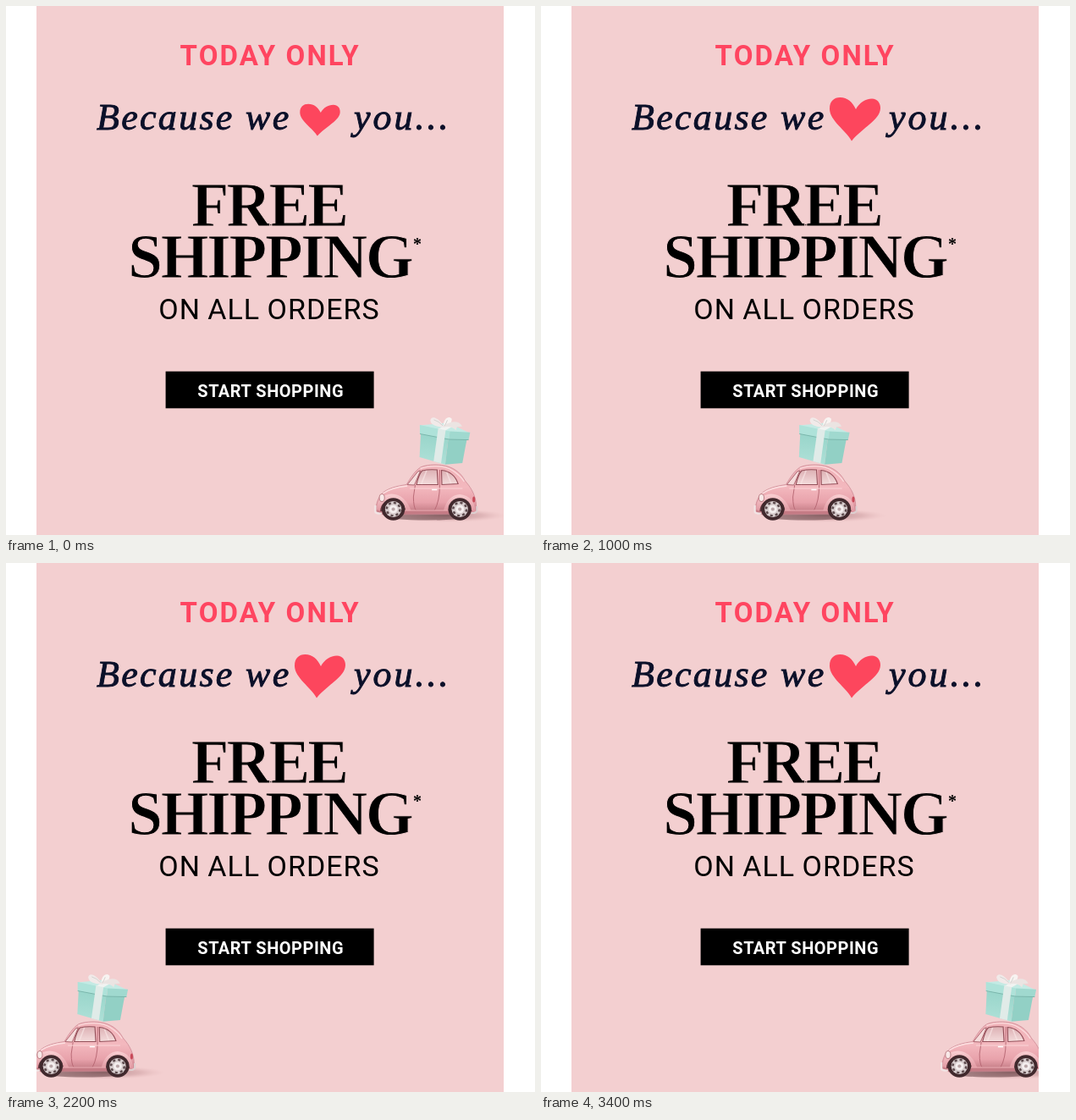
An HTML page that plays this animation: 625 by 625 pixels, repeating every 3600 ms.

```html
<!DOCTYPE html>
<html lang="en">
<head>
<meta charset="utf-8">
<title>Free shipping</title>
<style>
  html, body { margin: 0; width: 100%; height: 100%; overflow: hidden; background: #fff; }
  svg { display: block; width: 100vw; height: 100vh; }
  text { white-space: pre; }
  .sans { font-family: Roboto, sans-serif; text-anchor: middle; }
  .serif { font-family: "Liberation Serif", "Times New Roman", serif; }
  .script { font-size: 44px; font-style: italic; fill: #0b1029; stroke: #0b1029; stroke-width: .9; }
  /* a card-coloured stroke thins the hairlines */
  .big { font-size: 73px; font-weight: 700; text-anchor: middle; stroke: #f3cfd0; stroke-width: 1; }
</style>
</head>
<body>
<svg viewBox="0 0 625 625" xmlns="http://www.w3.org/2000/svg">
  <defs>
    <clipPath id="card"><rect x="36" width="552" height="625"/></clipPath>
    <linearGradient id="paint" x1="0" y1="0" x2="0" y2="1">
      <stop offset="0" stop-color="#f0b2b8"/>
      <stop offset=".45" stop-color="#f3b8be"/>
      <stop offset=".75" stop-color="#e8a2ab"/>
      <stop offset="1" stop-color="#b9717a"/>
    </linearGradient>
    <linearGradient id="fender" x1="0" y1="0" x2="0" y2="1">
      <stop offset="0" stop-color="#fad0d3"/>
      <stop offset="1" stop-color="#df949e"/>
    </linearGradient>
    <linearGradient id="glass" x1="0" y1="0" x2="0" y2="1">
      <stop offset="0" stop-color="#dcb0b3"/>
      <stop offset="1" stop-color="#f4dcdc"/>
    </linearGradient>
    <linearGradient id="boxFront" x1="0" y1="0" x2="0" y2="1">
      <stop offset="0" stop-color="#98d5ca"/>
      <stop offset="1" stop-color="#aee0d7"/>
    </linearGradient>
    <radialGradient id="shade">
      <stop offset="0" stop-color="#8f5c60" stop-opacity=".6"/>
      <stop offset=".6" stop-color="#b98488" stop-opacity=".35"/>
      <stop offset="1" stop-color="#e0b2b4" stop-opacity="0"/>
    </radialGradient>
    <g id="wheel">
      <circle r="13.2" fill="#41292d"/>
      <circle r="9.4" fill="#d6cbcc"/>
      <circle r="7.6" fill="none" stroke="#5d4a4d" stroke-width="2.4" stroke-dasharray="3 2.97"/>
      <circle r="4.8" fill="#f4eeee"/>
      <circle r="2" fill="#b9a5a7"/>
    </g>
  </defs>

  <rect x="36" width="552" height="625" fill="#f3cfd0"/>

  <text class="sans" x="312.2" y="70" font-size="33" font-weight="700" letter-spacing="2.1" fill="#ff4560">TODAY ONLY</text>

  <text class="serif script" x="107" y="146" letter-spacing="2.3">Because we</text>
  <text class="serif script" x="411" y="146" letter-spacing="3">you...</text>
  <path id="heart" fill="#fd465d" d="M-4 26C-10 14-30 2-30-12C-30-21-25-25.500-17.500-25.500C-9-25.500-3-20 1-11.500C5-19 12-24 20-24C26.500-24 30-19 30-13C30 1 9 10-4 26Z"/>

  <text class="serif big" x="310.500" y="260" letter-spacing="-2.8">FREE</text>
  <text class="serif big" x="312" y="321" letter-spacing="-2.2">SHIPPING</text>
  <text class="serif" x="486" y="288" font-size="20" font-weight="700" text-anchor="middle">*</text>
  <text class="sans" x="311" y="370" font-size="34" letter-spacing="1" word-spacing="-1">ON ALL ORDERS</text>

  <rect x="188.600" y="431.700" width="246" height="43.600"/>
  <text class="sans" x="312.700" y="461.500" font-size="20" font-weight="700" letter-spacing=".5" fill="#fff">START SHOPPING</text>

  <g clip-path="url(#card)">
    <g id="car">
      <ellipse cx="520" cy="602" rx="72" ry="8" fill="url(#shade)"/>
      <ellipse cx="497" cy="603" rx="49" ry="4.500" fill="#5d3a3e" opacity=".5"/>

      <!-- gift -->
      <g transform="rotate(5 517 518)">
        <path d="M489 507L522 510L521 541.500L490 535.500Z" fill="url(#boxFront)"/>
        <path d="M522 510L544 508L541 538L521 541.500Z" fill="#92d0c5"/>
        <path d="M487 498L520 492L547 502L523 504Z" fill="#c4eae4"/>
        <path d="M487 497.500L523 502L523 511.500L488 508Z" fill="#aee2d9"/>
        <path d="M523 502L547 501L546 510L523 511.500Z" fill="#a0d9cf"/>
        <path d="M488 508L523 511.500L546 510" fill="none" stroke="#78b5aa" stroke-width=".9"/>
        <path d="M509 499L518 500.500L516 540.500L507 539Z" fill="#e0ebe8"/>
        <path d="M510 500L520 493L527 495L518 501Z" fill="#f1f3f1"/>
        <path d="M515 496C506 485 499 486 499 491C500 497 508 498 515 498Z" fill="#f1eae9"/>
        <path d="M515 496C514 488 520 483 524 487C525 492 520 496 515 498Z" fill="#f8f3f1"/>
        <path d="M515 496C524 489 533 488 537 495L531 496L530 500C525 496 520 496 515 498Z" fill="#ebe4e2"/>
        <path d="M503 490Q509 491 514 496M519 489Q518 493 516 496" fill="none" stroke="#cfd0cd" stroke-width=".9"/>
      </g>

      <g transform="translate(-17 0) scale(1.034 1)">
        <!-- body -->
        <path d="M439 597C439 589 441 582 446 576C452 570 463 567 474 565.500C479 557 484 549 490 545C496 542 507 541.500 514 542.500C527 544 536 551 541 561C546 567 552 575 553.500 587L554 596L545 600L447 601Z" fill="url(#paint)" stroke="#c98590" stroke-width=".7"/>
        <path d="M490 546.500C500 542.500 517 542 527 549C533 553 537 557 540 562" fill="none" stroke="#fbdcdd" stroke-width="1.400"/>
        <path d="M447 576C455 570 465 568 475 567" fill="none" stroke="#fce0e1" stroke-width="1.500"/>
        <path d="M475 565.500L487 550L490 549L483 566Z" fill="#f5dcdc" stroke="#a55f69" stroke-width=".9"/>
        <path d="M485.500 565.500C487 558 489 552 492 549C498 547.500 504 547.500 509 548L510 565.500Z" fill="url(#glass)" stroke="#944f59" stroke-width="1.100"/>
        <path d="M514 548.500C523 549.500 530 555 533 564.500L514.500 565.500Z" fill="url(#glass)" stroke="#944f59" stroke-width="1.100"/>
        <path d="M497 549L491 565M520 551L525 564" stroke="#f9e7e6" stroke-width="1.500" opacity=".65"/>
        <path d="M484 566L482 580Q482 592 485 596H506Q512 585 512 566V548" fill="none" stroke="#b56571" stroke-width=".9"/>
        <path d="M478 570H538" stroke="#fbd5d8" stroke-width="1"/>
        <path d="M503 571.500H509" stroke="#fff" stroke-width="1.500"/>

        <!-- fenders, bumpers and lamps -->
        <path d="M440 595C440 583 447 577 457 576.500C468 577 475 584 480 598L472 597C470 586 465 582 458 582C450 582 446 588 445 597Z" fill="url(#fender)"/>
        <path d="M516 598C519 584 526 577.500 535 577C546 578 552 586 553 597L548 598C547 588 542 582.500 535 582.500C527 583 523 588 522 598Z" fill="url(#fender)"/>
        <path d="M444 597A14.500 14.500 0 0 1 473 597ZM521 597A14.500 14.500 0 0 1 549 597Z" fill="#63373e"/>
        <path d="M472 596H522V600H473Z" fill="#c57b85"/>
        <path d="M472 596H522" stroke="#f0b3b9" stroke-width="1"/>
        <ellipse cx="446" cy="581" rx="3" ry="4.500" fill="#f8e9e8" stroke="#bc8087" stroke-width="1"/>
        <ellipse cx="551" cy="583" rx="1.500" ry="3.500" fill="#c84a59"/>
        <path d="M438.500 590V598Q440 600 446 599.500" fill="none" stroke="#f1e4e4" stroke-width="2.200"/>
        <path d="M554.500 591V597Q553 599.500 548 599" fill="none" stroke="#ddcfd0" stroke-width="2"/>

        <use href="#wheel" x="459" y="594.500"/>
        <use href="#wheel" x="535" y="594.500"/>
      </g>
    </g>
  </g>
</svg>
<script>
  const LOOP = 3600, STEP = 200, STRIDE = 36.75, RETURN_STEP = 15;
  const count = LOOP / STEP;
  const heart = document.getElementById("heart");
  const car = document.getElementById("car");

  function draw(ms) {
    const step = Math.floor((ms % LOOP) / STEP);
    const lap = step >= RETURN_STEP ? count : 0;
    car.setAttribute("transform", `translate(${(lap - step) * STRIDE} 0)`);
    heart.setAttribute("transform", step % 2
      ? "translate(371 133.5)"
      : "translate(371 134.5) scale(.79 .735)");
  }

  let start;
  function tick(now) {
    start ??= now;
    draw(now - start);
    requestAnimationFrame(tick);
  }
  draw(0);
  requestAnimationFrame(tick);
</script>
</body>
</html>
```
